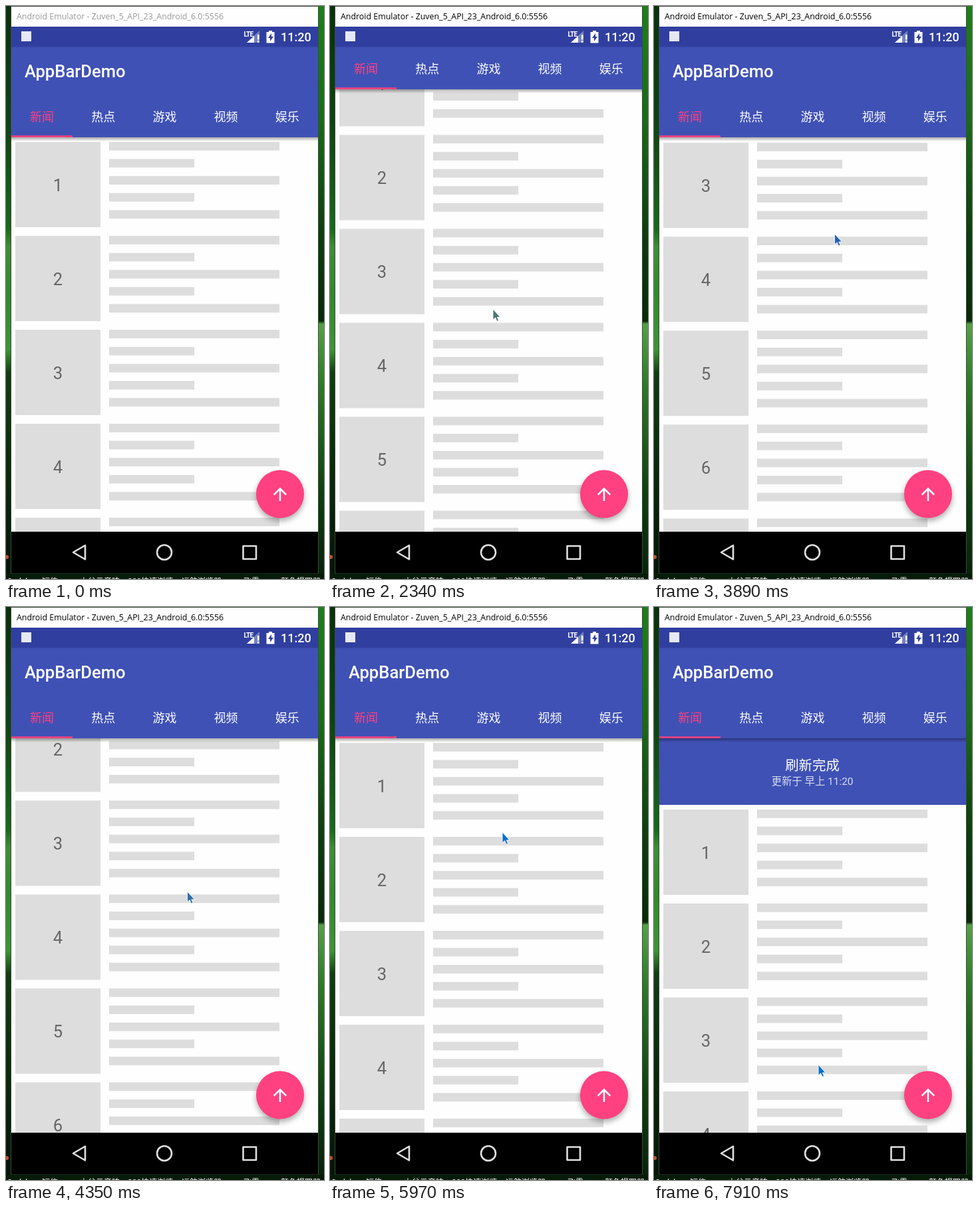
Write an HTML page that moves like this. It is 478 by 860 pixels and loops after 7.99 s.

```html
<!DOCTYPE html>
<html lang="zh">
<head>
<meta charset="utf-8">
<style>
html, body { margin: 0; width: 100%; height: 100%; overflow: hidden; background: #06200a; }
svg { display: block; width: 478px; height: 860px; }
text { font-family: Roboto, "Noto Sans CJK SC", "Noto Sans CJK", sans-serif; }
.mid { text-anchor: middle; }
</style>
</head>
<body>
<svg id="stage" viewBox="0 0 478 860">
  <defs>
    <linearGradient id="left" x2="0" y2="1">
      <stop offset="0" stop-color="#0a300c"/><stop offset=".2" stop-color="#0d4310"/>
      <stop offset=".39" stop-color="#176a18"/><stop offset=".42" stop-color="#3d8f35"/>
      <stop offset=".5" stop-color="#2f8a2a"/><stop offset=".6" stop-color="#3a9632"/>
      <stop offset=".64" stop-color="#0f3d10"/><stop offset="1" stop-color="#041505"/>
    </linearGradient>
    <linearGradient id="right" x2="0" y2="1">
      <stop offset="0" stop-color="#1f7d1c"/><stop offset=".2" stop-color="#1a6a18"/>
      <stop offset=".4" stop-color="#0d3d0e"/><stop offset=".55" stop-color="#082a0a"/>
      <stop offset=".555" stop-color="#55a048"/><stop offset=".66" stop-color="#2e7a28"/>
      <stop offset=".85" stop-color="#0f4010"/><stop offset="1" stop-color="#06200a"/>
    </linearGradient>
    <linearGradient id="shade" x2="0" y2="1">
      <stop offset="0" stop-opacity=".34"/><stop offset="1" stop-opacity="0"/>
    </linearGradient>
    <filter id="blur" x="-30%" y="-30%" width="160%" height="160%"><feGaussianBlur stdDeviation="4"/></filter>
    <clipPath id="page"><rect x="8" y="61" width="461" height="728"/></clipPath>
  </defs>

  <rect width="9" height="860" fill="url(#left)"/>
  <rect x="469" width="9" height="860" fill="url(#right)"/>
  <rect y="852" width="478" height="8" fill="#061c08"/>
  <circle cx="1" cy="827" r="3" fill="#c8502c"/>
  <g id="dock" fill="#fff" font-size="12"></g>

  <rect x="7.5" y=".5" width="462" height="851" fill="#fefefe" stroke="#3c4a3c"/>
  <text id="caption" x="16" y="20" style="font:12.4px 'Open Sans',sans-serif">Android Emulator - Zuven_5_API_23_Android_6.0:5556</text>

  <g clip-path="url(#page)">
    <g id="list"></g>
    <rect id="head" x="8" y="150" width="461" fill="#3f51b5"/>
    <g id="notice" fill="#fff">
      <text id="state" class="mid" x="238" y="-52" font-size="20.4"></text>
      <text id="stamp" class="mid" x="238" y="-30" font-size="15.4" fill-opacity=".8"></text>
      <g id="arrow"><path d="M-2-11h4V4l5-5 3 3L0 12-10 2l3-3 5 5z"/></g>
      <g id="spin"></g>
    </g>
    <g id="bar">
      <rect x="8" y="197" width="461" height="6" fill="url(#shade)"/>
      <rect x="8" y="61" width="461" height="136" fill="#3f51b5"/>
      <text x="28" y="107" font-size="25.6" font-weight="500" fill="#fff">AppBarDemo</text>
      <g id="tabs" class="mid" font-size="18"></g>
      <rect x="8" y="194.3" width="92" height="2.7" fill="#ff4081"/>
    </g>
  </g>

  <rect x="8" y="31" width="461" height="30.5" fill="#303f9f"/>
  <rect x="23" y="38" width="15" height="15" fill="#e6e9f5"/>
  <g fill="#fff">
    <text x="357.5" y="45.5" font-size="10" font-weight="700" letter-spacing="-.8">LTE</text>
    <path d="M381 37V55H362z" fill-opacity=".35"/>
    <path d="M373 45V55H362z"/>
    <path d="M378 43h2.6v7.5H378zM378 52h2.6v2.8H378z"/>
    <path d="M395 37h5v2h3.500v16.500h-12V39h3.500z"/>
    <path d="M399 41l-5 7h3v5l5-7h-3z" fill="#303f9f"/>
    <text x="413" y="53" font-size="18" font-weight="500">11:20</text>
  </g>

  <circle cx="412" cy="737" r="36" opacity=".32" filter="url(#blur)"/>
  <circle cx="412" cy="732.5" r="36" fill="#ff4081"/>
  <path transform="translate(396.600 717.400) scale(1.28)" fill="#fff"
    d="M4 12l1.410 1.410L11 7.830V20h2V7.830l5.580 5.590L20 12l-8-8-8 8z"/>

  <rect x="8" y="789" width="461" height="62.500"/>
  <g fill="none" stroke="#e0e0e0" stroke-width="2.6" stroke-linejoin="round">
    <path d="M101 820L119 809.500V830.500z"/>
    <circle cx="238" cy="820" r="11"/>
    <rect x="356.500" y="810.500" width="19.500" height="19.500"/>
  </g>

  <path id="mouse" d="M0 0V16L3.600 12.800 6 18.200 8.600 17 6.300 12H11z" stroke="#fff" stroke-width=".9"/>
</svg>
<script>
const $ = id => document.getElementById(id);
const LOOP = 7990, START = 400, STEP = 77.45;

// Keys are [step, value...]
const SCROLL = [[12, 204], [16, 161.5], [25, 52.5], [36, -165], [38, -165], [39, -162],
  [51, 8.5], [58, 204], [61, 235], [63, 250], [66, 204], [72, 204], [81, 360], [82, 368],
  [83, 368], [86, 304]];
const POINTER = [[0, 400, 850], [4, 300, 640], [7, 217, 512], [9, 222, 632], [12, 222, 632],
  [16, 226, 580], [25, 245, 455], [36, 270, 254], [38, 270.5, 254], [39, 270.5, 257],
  [51, 272.5, 427], [60, 270, 622], [63, 268, 690], [66, 268, 690], [71, 259, 338],
  [72, 259, 338], [82, 248, 690], [94, 249, 689], [97, 247, 687]];
const TINTS = [[0, '#3f51b5'], [22, '#4d7770'], [33, '#2160c0'], [48, '#2f6ea5'], [62, '#0a6fca']];

function at(keys, k, col = 1) {
  const i = keys.findIndex(key => key[0] > k);
  if (i === 0) return keys[0][col];
  if (i < 0) return keys[keys.length - 1][col];
  const a = keys[i - 1], b = keys[i];
  return a[col] + (b[col] - a[col]) * (k - a[0]) / (b[0] - a[0]);
}
const clamp = (v, lo, hi) => Math.min(hi, Math.max(lo, v));
const move = (id, x, y, rest = '') => $(id).setAttribute('transform', `translate(${x} ${y}) ${rest}`);
const show = (id, on) => { $(id).style.display = on ? '' : 'none'; };
const box = (x, y, w, h) => `<rect x="${x}" y="${y}" width="${w}" height="${h}"/>`;

function build() {
  $('tabs').innerHTML = ['新闻', '热点', '游戏', '视频', '娱乐'].map((name, i) =>
    `<text x="${54 + 92.2 * i}" y="172.500" fill="${i ? '#fff' : '#ff4081'}">${name}</text>`).join('');
  const labels = [[2, 'Sodal'], [54, '短信'], [111, '山谷云音响'], [183, '280快速浏览'],
    [264, '远航浏览器'], [357, '飞雪'], [413, '颜色提取器']];
  $('dock').innerHTML = labels.map(([x, s]) => `<text x="${x}" y="868">${s}</text>`).join('');
  let rows = '';
  for (let i = 0; i < 9; i++) {
    const y = 141 * i;
    let shapes = box(14, y, 128, 128);
    for (let j = 0; j < 5; j++) shapes += box(155, y + 25.6 * j, j % 2 ? 128 : 256, 12.8);
    rows += `<g fill="#ddd">${shapes}</g>
      <text class="mid" x="78" y="${y + 73.5}" font-size="25.6" fill="#666">${i + 1}</text>`;
  }
  $('list').innerHTML = rows;
  let spokes = '';
  for (let i = 0; i < 12; i++)
    spokes += `<rect x="-1" y="-11" width="2" height="6" rx="1" opacity="${(i + 2) / 13}" transform="rotate(${30 * i})"/>`;
  $('spin').innerHTML = spokes;
}

function draw(t) {
  const k = Math.floor((t - START) / STEP + 0.15);
  const top = at(SCROLL, k), base = top - 7;
  const busy = k >= 84, done = k >= 97, ready = base >= 297;

  move('list', 0, top);
  move('bar', 0, clamp(k < 37 ? top - 204 : top + 93, -72, 0));
  $('head').setAttribute('height', Math.max(0, base - 150));
  show('head', base > 197);
  show('notice', base > 197);
  move('notice', 0, base);
  $('state').textContent = done ? '刷新完成' : busy ? '正在刷新...' : ready ? '释放立即刷新' : '下拉可以刷新';
  $('stamp').textContent = '更新于 早上 11:' + (done ? 20 : 19);
  show('arrow', !busy);
  move('arrow', 136, -50, `rotate(${ready ? 180 : 0})`);
  show('spin', busy && !done);
  move('spin', 136, -50, `rotate(${30 * k})`);

  $('caption').setAttribute('fill', k < 13 ? '#999' : '#000');
  show('mouse', k >= 0);
  move('mouse', at(POINTER, k, 1), at(POINTER, k, 2));
  const tint = TINTS.filter(c => c[0] <= k).pop() || TINTS[0];
  $('mouse').setAttribute('fill', tint[1]);
}

build();
const begin = performance.now();
function tick() {
  draw((performance.now() - begin) % LOOP);
  requestAnimationFrame(tick);
}
tick();
</script>
</body>
</html>
```
